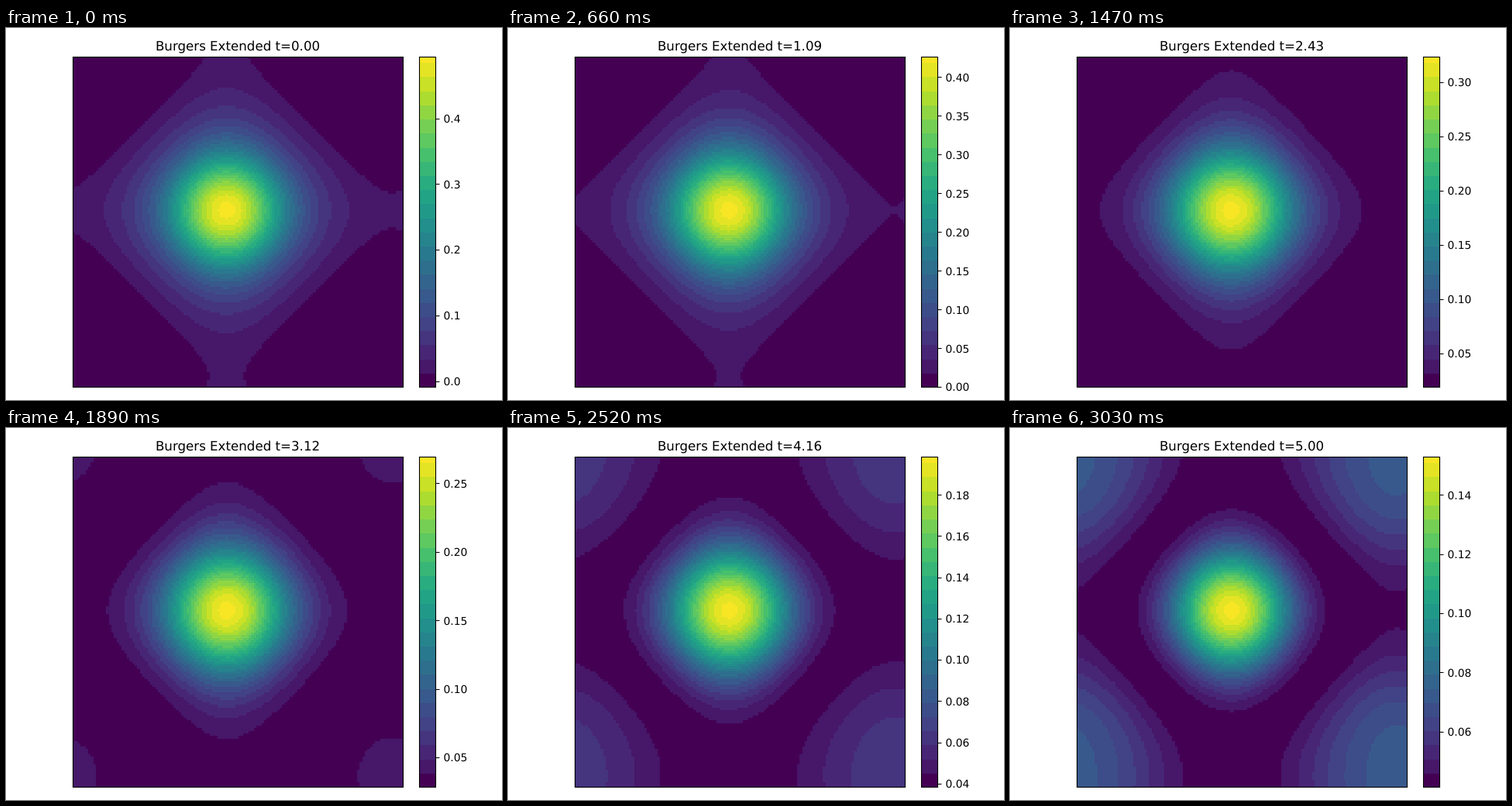
An HTML page with a canvas that plays this animation: 640 by 480 pixels, repeating every 3060 ms.

```html
<!DOCTYPE html>
<html lang="en">
<head>
<meta charset="utf-8">
<title>Heat map</title>
<style>
  html, body { margin: 0; width: 100%; height: 100%; overflow: hidden; background: #fff; }
  canvas, svg { position: absolute; left: 0; top: 0; width: 640px; height: 480px; }
  text { font: 13.889px "DejaVu Sans", sans-serif; fill: #000; text-rendering: geometricPrecision; }
  #title { font-size: 16.667px; text-anchor: middle; }
  .line { fill: none; stroke: #000; stroke-width: 1.1; }
</style>
</head>
<body>
<canvas id="map" width="640" height="480"></canvas>
<svg viewBox="0 0 640 480">
  <rect class="line" x="86.5" y="37.5" width="426" height="426"/>
  <rect class="line" x="533.5" y="37.5" width="21" height="426"/>
  <text id="title" x="299" y="29"></text>
  <g id="ticks"></g>
</svg>
<script>
const STEPS = 102, STEP_MS = 30, END = 5;
const CELLS = 128, SIZE = 426, LEFT = 86.5, TOP = 37.5;
const BANDS = 23.4;

const STOPS = ['440154', '482475', '414487', '355f8d', '2a788e', '21918c',
  '22a884', '44bf70', '7ad151', 'bddf26', 'fde725']
  .map(h => [0, 2, 4].map(i => parseInt(h.slice(i, i + 2), 16)));

function viridis(v) {
  const p = v * 10, i = Math.min(9, Math.floor(p));
  return STOPS[i].map((c, k) => Math.round(c + (STOPS[i + 1][k] - c) * (p - i)));
}

const bandOf = v => Math.floor(Math.max(0, Math.min(1, v)) * BANDS);
const PALETTE = Array.from({ length: Math.ceil(BANDS) }, (_, i) =>
  viridis(i && (i + Math.min(i + 1, BANDS)) / 2 / BANDS));

const smooth = x => x * x * (3 - 2 * x);

// Value range: the peak decays while the floor eases upwards
const highAt = x => .494 / (1 + x * (.56 + .535 * x + 1.135 * x * x));
const lowAt = x => -.0088 + .0501 * smooth(x ** .85);

// Normalised height, with p = cos x and q = cos y: a quartic in p + q that is
// 1 at the peak, and a slight stretch between the two axes
function heightAt(x) {
  const x2 = x * x, x4 = x2 * x2, grow = x2 * x;
  const corner = .28 * grow;
  const a0 = .049 - .105 * x2 + .077 * x4;
  const a1 = .112 - .13 * x2 - .07 * x4;
  const a2 = .108 * smooth(x);
  const a3 = ((1 - corner) / 2 - 2 * a1) / 8;
  const a4 = ((1 + corner) / 2 - a0 - 4 * a2) / 16;
  const tilt = .013 * x2 - .02 * x4, stretch = .0233 * grow;
  return (p, q) => {
    const s = p + q;
    return a0 + s * (a1 + s * (a2 + s * (a3 + s * a4))) + (p - q) * (stretch * s + tilt);
  };
}

const $ = id => document.getElementById(id);
const ctx = $('map').getContext('2d');
const grid = document.createElement('canvas');
grid.width = grid.height = CELLS;
const gridCtx = grid.getContext('2d');
const image = gridCtx.createImageData(CELLS, CELLS);

const cosines = (start, mid) => Array.from({ length: CELLS }, (_, i) =>
  Math.cos((start + (i + .5) * SIZE / CELLS - mid) * 2 * Math.PI / SIZE));

function drawField(x) {
  const height = heightAt(x);
  const cols = cosines(LEFT, 284.6 + 1.2 * x), rows = cosines(TOP, 235.4);
  let k = 0;
  for (const q of rows) for (const p of cols) {
    image.data.set(PALETTE[bandOf(height(p, q))], k);
    image.data[k + 3] = 255;
    k += 4;
  }
  gridCtx.putImageData(image, 0, 0);
  ctx.imageSmoothingEnabled = false;
  ctx.drawImage(grid, 86, 37, 427, 427);
}

function drawBar() {
  for (let y = 37; y < 464; y++) {
    ctx.fillStyle = `rgb(${PALETTE[bandOf((463.5 - y) / SIZE)]})`;
    ctx.fillRect(533, y, 22, 1);
  }
}

function drawTicks(low, high) {
  const raw = (high - low) / 9, unit = 10 ** Math.floor(Math.log10(raw));
  const mult = [1, 2, 2.5, 5, 10].find(m => m * unit >= raw);
  const step = mult * unit;
  const digits = mult === 2.5 ? 3 : step > .09 ? 1 : 2;
  let out = '';
  // Small slack keeps a tick that sits on the lower end
  for (let i = Math.ceil(low / step - .02); i * step <= high; i++) {
    const y = Math.min(TOP + SIZE, TOP + SIZE * (high - i * step) / (high - low));
    const line = Math.floor(y) + .5;
    out += `<path class="line" d="M555 ${line}h4.5"/>` +
      `<text x="564.5" y="${Math.round(y + 4.8)}">${Math.abs(i * step).toFixed(digits)}</text>`;
  }
  $('ticks').innerHTML = out;
}

let shown = -1;
function render(now) {
  const n = Math.floor(Math.max(0, now - start) / STEP_MS) % STEPS;
  if (n !== shown) {
    shown = n;
    const x = n / (STEPS - 1);
    drawField(x);
    drawTicks(lowAt(x), highAt(x));
    $('title').textContent = 'Burgers Extended t=' + (x * END).toFixed(2);
  }
  requestAnimationFrame(render);
}

drawBar();
const start = performance.now();
render(start);
</script>
</body>
</html>
```
